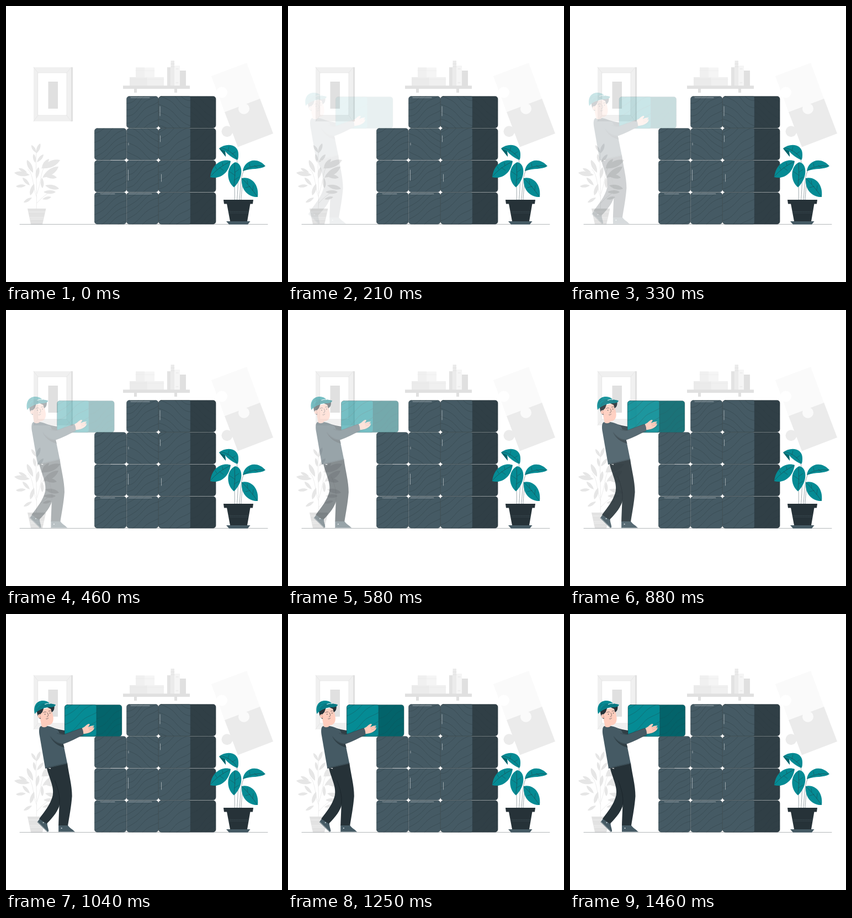
Recreate the animation shown at these times as an HTML page with a canvas. Size 500 by 500 pixels, loop 1.5 s.

```html
<!DOCTYPE html>
<html lang="en">
<head>
<meta charset="utf-8">
<title>Stacking boxes</title>
<style>
  html, body { margin: 0; width: 100%; height: 100%; overflow: hidden; background: #fff; }
  canvas { display: block; width: 500px; height: 500px; }
</style>
</head>
<body>
<canvas id="stage"></canvas>
<script>
const SIZE = 500, LOOP = 1500, STEP = 1000 / 24;
const DPR = window.devicePixelRatio || 1;
const INK = '#263238', SLATE = '#455a64', SLATE_DARK = '#303f46';
const TEAL = '#058b94', TEAL_DARK = '#03636a', SKIN = '#ffcdbd';

function setup(canvas) {
  canvas.width = canvas.height = SIZE * DPR;
  const ctx = canvas.getContext('2d');
  ctx.scale(DPR, DPR);
  ctx.lineCap = ctx.lineJoin = 'round';
  return ctx;
}

const view = setup(document.getElementById('stage'));
const room = setup(document.createElement('canvas'));
const mover = setup(document.createElement('canvas'));

function fill(c, d, color) {
  c.fillStyle = color;
  c.fill(new Path2D(d));
}

function line(c, d, color = INK, width = 0.7, alpha = 1) {
  c.save();
  c.globalAlpha *= alpha;
  c.strokeStyle = color;
  c.lineWidth = width;
  c.stroke(new Path2D(d));
  c.restore();
}

function rect(c, x, y, w, h, color) {
  c.fillStyle = color;
  c.fillRect(x, y, w, h);
}

function disc(c, x, y, r, color) {
  c.fillStyle = color;
  c.beginPath();
  c.arc(x, y, r, 0, 7);
  c.fill();
}

function rounded(c, x, y, w, h, r, color) {
  c.beginPath();
  c.roundRect(x, y, w, h, r);
  c.fillStyle = color;
  c.fill();
  c.strokeStyle = 'rgba(38, 50, 56, 0.6)';
  c.lineWidth = 0.5;
  c.stroke();
}

// Pointed leaf from base to tip, bulging by `fat` of its length.
function leaf(c, x, y, tx, ty, color, fat = 0.2) {
  const dx = tx - x, dy = ty - y, nx = -dy * fat, ny = dx * fat;
  c.beginPath();
  c.moveTo(x, y);
  c.bezierCurveTo(x + dx * .35 + nx, y + dy * .35 + ny, x + dx * .75 + nx, y + dy * .75 + ny, tx, ty);
  c.bezierCurveTo(x + dx * .75 - nx, y + dy * .75 - ny, x + dx * .35 - nx, y + dy * .35 - ny, x, y);
  c.fillStyle = color;
  c.fill();
}

// Wavy wood lines across one face.
function grain(c, x, y, seed, flip, width = 58, alpha = 0.6) {
  c.save();
  c.beginPath();
  c.roundRect(x, y, width, 57.6, 4);
  c.clip();
  c.translate(flip ? x + width : x, y);
  if (flip) c.scale(-1, 1);
  for (let i = 0; i < 7; i++) {
    const h = 10 + i * 14 + 3 * Math.sin(seed * 2 + i);
    const bend = 5 * Math.sin(seed + i * 0.5);
    line(c, `M-1 ${h}C14 ${h - 3 + bend} 20 ${h - 12} 29 ${h - 22}S46 ${h - 33 + bend} 59 ${h - 40}`, INK, 0.5, alpha);
  }
  c.restore();
}

function crate(c, x, y, front, side, seed, flip) {
  rounded(c, x, y, 103.7, 57.4, 5, side);
  grain(c, x + 57.7, y, seed + 1, flip, 46, 0.3);
  rounded(c, x, y, 57.7, 57.4, [5, 3, 3, 5], front);
  grain(c, x, y, seed, flip);
}

function drawPicture(c) {
  rect(c, 50, 111, 71, 98, '#e0e0e0');
  rect(c, 50, 111, 68, 98, '#f0f0f0');
  rect(c, 58, 121, 52, 77, '#fff');
  line(c, 'M50 111L58 121M118 111L110 121M50 209L58 198M118 209L110 198M58 121H110V198H58Z', '#e2e2e2');
  rect(c, 76.5, 137, 17.5, 49, '#e0e0e0');
}

function drawShelf(c) {
  rect(c, 224, 129, 62, 16, '#f0f0f0');
  rect(c, 224, 129, 31, 16, '#ebebeb');
  rect(c, 235, 111.5, 34, 18, '#f5f5f5');
  rect(c, 235, 111.5, 16, 18, '#f0f0f0');
  line(c, 'M235 117H269M224 133H286M255 129V144', '#e4e4e4', 0.5);
  rect(c, 292, 111, 6.5, 34, '#e3e3e3');
  rect(c, 298.5, 99, 6.5, 46, '#ebebeb');
  rect(c, 305, 108, 10, 37, '#f5f5f5');
  rect(c, 315, 117, 11, 28, '#e0e0e0');
  line(c, 'M298.5 105H305M298.5 110H305M308 114H312M308 139H312', '#dcdcdc', 0.6);
  rect(c, 212, 144.3, 121, 5.7, '#e0e0e0');
  rect(c, 232, 150, 5, 7, '#e0e0e0');
  rect(c, 305, 150, 5, 7, '#e0e0e0');
}

function drawPuzzle(c) {
  fill(c, 'M396 192L460 167.5L484 231L420 255.5Z', '#ebebeb');
  disc(c, 400.5, 227.3, 10, '#ebebeb');
  fill(c, 'M372 127L436 103L460 168L396 192Z', '#fafafa');
  disc(c, 431, 186, 10, '#fafafa');
  disc(c, 391, 156.5, 10, '#fff');
}

function drawPalePlant(c) {
  const gray = '#e6e6e6';
  line(c, 'M55 367C57 330 53 300 55 262M56 340C64 320 62 300 72 287M55 345C48 325 50 305 40 296M56 357C62 350 68 345 75 340', gray, 0.7);
  const leaves = [
    [55, 267, 62, 249], [55, 266, 46, 252], [56, 283, 68, 269], [53, 284, 50, 268],
    [49, 302, 38, 279], [43, 306, 15, 302], [38, 302, 23, 294], [36, 325, 18, 327],
    [43, 325, 30, 311], [51, 322, 44, 343], [47, 347, 32, 356], [64, 294, 98, 279],
    [65, 292, 78, 277], [66, 311, 95, 291], [68, 306, 92, 311], [65, 311, 66, 330],
    [71, 325, 96, 331], [68, 337, 90, 337], [66, 350, 82, 346], [55, 313, 59, 292]
  ];
  for (const p of leaves) leaf(c, ...p, gray);
  fill(c, 'M39 367H72.5L66 395.5H45Z', '#e2e2e2');
  line(c, 'M41 373H71M43 383H69M44 386H68', '#f5f5f5');
}

function drawStack(c) {
  const rows = [163.5, 221.6, 279.7, 337.8];
  rows.forEach((y, row) => {
    for (let col = row ? 0 : 1; col < 2; col++) {
      const x = 160.3 + col * 58.1;
      rounded(c, x, y, 57.7, 57.4, 5, SLATE);
      grain(c, x, y, row * 3 + col, row === 1 && col === 1);
    }
    crate(c, 276.5, y, SLATE, SLATE_DARK, row * 3 + 2, row === 0);
  });
  line(c, 'M226 166H260M279 182V199M279.5 235V246M190 279.4H216M221.5 297V316M281.5 305V318M171 340.3H197M222 340.3H264M222 248V252', '#fff', 0.8, 0.6);
}

function drawTealPlant(c) {
  line(c, 'M414.5 351L414 325M418.5 351C421 325 421 300 418 276M423 351C425 328 425 305 432 297M426 351C427 338 427 325 430 318', '#78868c', 0.7);
  const leaves = [
    'M386 258C400 247 421 251 421 268C421 273 421 277 419 279C412 276 402 270 397 263L398 273Z',
    'M407 281C395 276 373 283 370 310C383 314 403 307 407 281Z',
    'M415 283C429 284 432 310 413 328.5C399 318 398 291 415 283Z',
    'M429 299C431 281 453 271 470 290C460 297 446 293 429 299Z',
    'M427 312C441 308 459 320 456 346C441 347 425 335 427 312Z'
  ];
  for (const d of leaves) fill(c, d, TEAL);
  fill(c, 'M386 258L397 263L398 273Z', TEAL_DARK);
  line(c, 'M388 257Q406 259 419 277M371 308Q385 292 406 282M414 285Q416 306 413 326M430 298Q446 287 468 290M428 313Q441 325 455 345', INK, 0.5);
  line(c, 'M382 296L379 291M387 293L394 298M393 289L392 284M415 301L422 296M415 307L405 300M414 315L422 310M442 291L441 285M450 289L456 293M438 322L437 316M442 327L434 329M447 334L448 325M402 262L404 255M410 268L416 264', INK, 0.4);
  fill(c, 'M399 390H442.5L438 395.7H404Z', SLATE);
  fill(c, 'M400 358H442.5L437 390H406Z', INK);
  fill(c, 'M394 351H448L447 358.5H395Z', INK);
  c.setLineDash([1.5, 1.5]);
  line(c, 'M404 372.5H439M404 375H439', '#607680', 0.5, 0.6);
  c.setLineDash([]);
}

function drawRoom(c) {
  rect(c, 0, 0, SIZE, SIZE, '#fff');
  drawPicture(c);
  drawShelf(c);
  drawPuzzle(c);
  drawPalePlant(c);
  line(c, 'M25 395.5H474', INK, 0.35);
  drawStack(c);
  drawTealPlant(c);
}

function drawLegs(c) {
  fill(c, 'M61 370L74 379C74 385 77 390 76.5 394L74 394.5L56 377Z', SLATE);
  line(c, 'M56.5 376.5L74.5 394.3', '#8d9ba1', 1.2);
  fill(c, 'M94.5 382H111C114 388 121 390 124 395H94.5Z', SLATE);
  line(c, 'M95 394.5H123.5', '#8d9ba1', 1.2);
  disc(c, 100, 388, 1.1, '#cfd8dc');
  disc(c, 67, 378, 1.1, '#cfd8dc');
  fill(c, 'M73 278C77 297 87 312 84 329C80 345 69 358 59.5 371L73 380C86 367 94 356 97 344L105 290Z', INK);
  fill(c, 'M73 279L110.5 270C113 290 119 310 119 330C117.5 350 114 367 111.5 383H94.5C95 365 96 350 96 337C92 318 84 300 80 279Z', INK);
  line(c, 'M96 344C98 330 93 315 88 302', '#10191e', 0.5);
}

function drawHead(c) {
  fill(c, 'M61 189L64 204C70 207 75 204 76 199Z', SKIN);
  fill(c, 'M62 174C70 172 79 168 82 172L85 187C86 197 81 202 74.5 201C68 200 64 196 62 190Z', SKIN);
  fill(c, 'M55 175L68 170L65 178L62 181L62 190C57 189 56 182 55 175Z', INK);
  fill(c, 'M74 169L87 167C87 173 86 176 82 178L80.5 172Z', INK);
  disc(c, 60.5, 185, 3.4, SKIN);
  line(c, 'M59.5 184Q62 183 62 187', '#b96f60', 0.5);
  disc(c, 70, 181.5, 0.8, INK);
  disc(c, 79, 179.5, 0.8, INK);
  line(c, 'M67 178.5Q69 176.5 72 177.5M76.5 176L80 175.5M74.5 179Q78 185 73.5 186.5M72 190Q74 191 76 188.5', INK, 0.6);
  fill(c, 'M51.5 181C48 166 55 156.500 67 157C74 157.5 77 160 79 162.500L89 164C89.500 167 85 169 76 169C67 170 57 174 51.5 181Z', TEAL);
  fill(c, 'M69 162.5C77 161.500 84 162.5 89 164.5C88 168 82 169 73 169C68 169 59 172 55 177C56 169 62 164 69 162.5Z', '#087983');
  line(c, 'M70 163.5Q75 161 79 162.5', '#d9f0f1', 1.1);
  line(c, 'M52 169Q57 163 68 162.5M60 158.5Q55 164 54 175', INK, 0.4, 0.6);
}

function drawBody(c) {
  drawLegs(c);
  fill(c, 'M63 203C75 201 86 205 94 211L103 234L110.5 271L70.5 280L60.5 222C58.5 212 59 204 63 203Z', SLATE);
  fill(c, 'M78 220C86 231 92 235 103 236L105 242C93 239 84 232 78 220Z', SLATE_DARK);
  drawHead(c);
  fill(c, 'M137 207L142 204C145 201 147 199 150.5 199L151 200.5L148 205C152 203 156 201.5 159.5 202.5L156 205.5L159.5 205.5L158 209.5C153 215 147 217 139 217Z', SKIN);
  line(c, 'M149 207L156 204.5M150 210L158 207', '#b96f60', 0.4);
  fill(c, 'M75 209C84 211 94 217 105 218C116 215 127 209 136.5 206.5C139 209 140 215 139.5 219C128 224 116 231 104 235C94 236 82 227 75 218Z', SLATE);
  line(c, 'M80 222C87 231 96 236 104 235C116 231 128 224 139 219M92 216C97 218 101 219 105 218L136 207M70.5 279L110 270', INK, 0.5, 0.8);
}

function drawMover(c) {
  fill(c, 'M84 206C92 208 99 210 107 211V219L95 220Z', SLATE_DARK);
  crate(c, 106.4, 164.4, TEAL, TEAL_DARK, 5, false);
  c.translate(0.8, 0);
  drawBody(c);
}

// Slide and fade in, then begin to drift back.
function pose(time) {
  const p = 0.5 - 0.5 * Math.cos(Math.PI * Math.min(time / 1100, 1));
  const drift = Math.max(0, (time - 1250) / 210);
  return { alpha: p, x: -22 * (1 - p) - 1.3 * drift ** 1.5 };
}

function render(now) {
  const step = Math.floor(((now % LOOP) + 4) / STEP);
  view.drawImage(room.canvas, 0, 0, SIZE, SIZE);
  if (step < 3 || step >= 36) return;
  const { alpha, x } = pose(step * STEP);
  mover.clearRect(0, 0, SIZE, SIZE);
  mover.save();
  mover.translate(x, 0);
  drawMover(mover);
  mover.restore();
  view.globalAlpha = alpha;
  view.drawImage(mover.canvas, 0, 0, SIZE, SIZE);
  view.globalAlpha = 1;
}

drawRoom(room);
const start = performance.now();
function tick() {
  render(performance.now() - start);
  requestAnimationFrame(tick);
}
tick();
</script>
</body>
</html>
```
